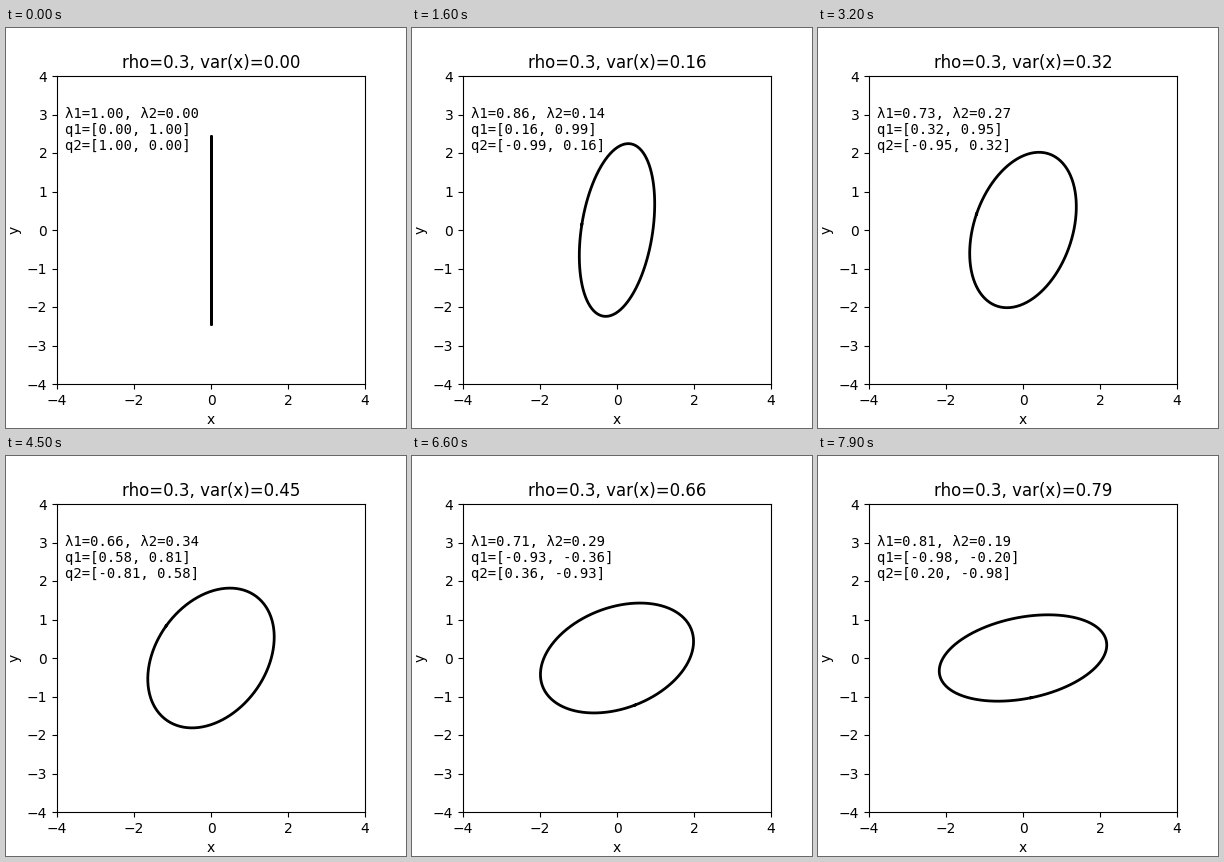
A matplotlib script for the animation above (8000 ms loop, 400 by 400 pixels).

```python
import numpy as np
import matplotlib.pyplot as plt
from matplotlib.animation import FuncAnimation

RHO = 0.3
FRAMES = 80
RADIUS = np.sqrt(-2 * np.log(0.05))  # 95 % contour of a 2-D Gaussian

theta = np.linspace(0, 2 * np.pi, 100)
circle = RADIUS * np.vstack([np.cos(theta), np.sin(theta)])

fig, ax = plt.subplots(figsize=(4, 4), dpi=100)
ax.set_aspect("equal")
ax.set(xlim=(-4, 4), ylim=(-4, 4), xlabel="x", ylabel="y",
       xticks=range(-4, 5, 2), yticks=range(-4, 5))
title = ax.set_title("")
curve, = ax.plot([], [], color="black", lw=2)
info = ax.text(-3.8, 2, "", family="DejaVu Sans Mono", size=10, va="bottom")


def covariance(var_x):
    var_y = 1 - var_x
    cov = RHO * np.sqrt(var_x * var_y)
    return np.array([[var_x, cov], [cov, var_y]])


def fmt(v):
    return f"[{v[0]:.2f}, {v[1]:.2f}]"


def update(i):
    var_x = i / 100
    (lam2, lam1), vecs = np.linalg.eigh(covariance(var_x))
    q2, q1 = vecs.T
    scale = np.sqrt(np.maximum([lam2, lam1], 0))
    curve.set_data(*(vecs * scale @ circle))
    title.set_text(f"rho={RHO}, var(x)={var_x:.2f}")
    info.set_text(f"λ1={lam1:.2f}, λ2={lam2:.2f}\nq1={fmt(q1)}\nq2={fmt(q2)}")
    return curve, title, info


anim = FuncAnimation(fig, update, frames=FRAMES, interval=100,
                     repeat=True, repeat_delay=0)
plt.show()
```
